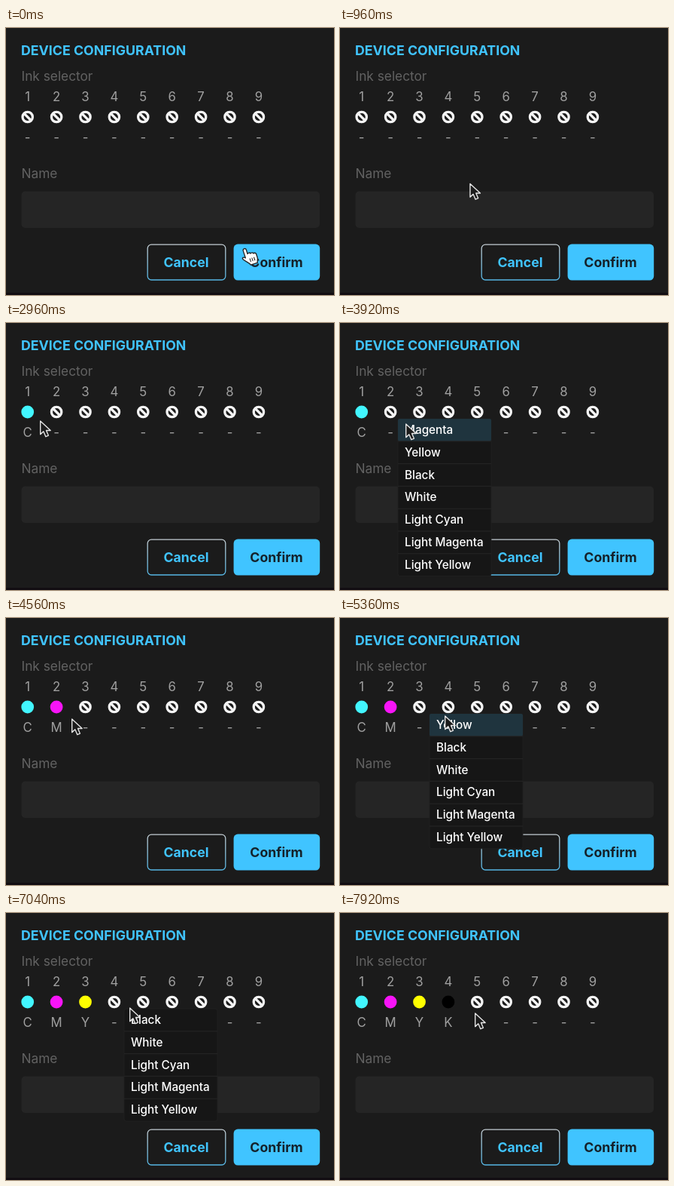
These frames come from a looping animation (436x354 px, 8 s). An HTML page:

```html
<!DOCTYPE html>
<html lang="en">
<head>
<meta charset="utf-8">
<title>Device configuration</title>
<style>
html, body { margin: 0; width: 100%; height: 100%; overflow: hidden; background: #1b1b1b; }
svg { display: block; font-family: Inter, sans-serif; font-size: 17.3px; }
.title { fill: #40c4ff; font-weight: 700; font-size: 17.75px; }
.label { fill: #626262; }
.digit, .code { fill: #a0a0a0; text-anchor: middle; font-size: 16.8px; }
.button { font-weight: 700; font-size: 17.7px; text-anchor: middle; }
.menu text { fill: #fff; font-weight: 500; font-size: 15.3px; }
</style>
</head>
<body>
<svg width="436" height="354" viewBox="0 0 436 354">
  <defs>
    <linearGradient id="edge" x2="0" y2="1">
      <stop stop-color="#c3ccd2"/><stop offset="1" stop-color="#55b5e2"/>
    </linearGradient>
    <g id="empty" fill="none" stroke="#f4f4f4">
      <circle r="6.7" stroke-width="3.3"/>
      <path d="M-5 -5L5 5" stroke-width="3.2"/>
    </g>
    <path id="plus" d="M-8 0H8M0 -8V8" stroke="#fff" stroke-width="2.8"/>
    <path id="arrow" transform="translate(.7 1) scale(.86)" d="M0 0V20.5l4.8-4.4 3.5 8 4.2-1.8-3.4-7.8h6.6z" fill="#1c1c1c" stroke="#e6e6e6" stroke-width="1.6" stroke-linejoin="round"/>
    <g id="hand" transform="rotate(-18) scale(.95)" stroke="#222" stroke-width="1.4" stroke-linejoin="round">
      <path d="M-2 2c0-3 4.5-3 4.5 0v6c1-1.5 4-1 4 .8 1-1 4-.6 4 1.2 1-.8 3.5 0 3.5 2v5c0 3-2 4-2 7h-10c-1-4-6-7-8-11-1-2.5 2-3 4-.5z" fill="#fff"/>
      <path d="M3.5 15v5M6.5 15v5M9.5 15v5" stroke-width="1.1"/>
    </g>
  </defs>
  <rect width="436" height="354" fill="#1b1b1b"/>
  <rect y="351" width="436" height="3" fill="#120d12"/>
  <text class="title" x="20" y="36">DEVICE CONFIGURATION</text>
  <text class="label" x="20.5" y="70">Ink selector</text>
  <text class="label" x="20.5" y="199">Name</text>
  <rect x="20.5" y="216.5" width="396.5" height="48.5" rx="5" fill="#252525"/>
  <rect x="188.2" y="287.2" width="103.6" height="46.8" rx="5" fill="none" stroke="url(#edge)" stroke-width="1.3"/>
  <text class="button" x="239.5" y="317" fill="#40c4ff">Cancel</text>
  <rect x="302.6" y="286.6" width="114.6" height="47.9" rx="5.5" fill="#40c4ff"/>
  <text class="button" x="359.5" y="317" fill="#14212a">Confirm</text>
  <g id="scene"></g>
</svg>
<script>
const LOOP = 8000, STEP = 80, ROW = 29.8, INK_Y = 118, MENU_Y = 127, MENU_W = 124;
const names = ['Cyan', 'Magenta', 'Yellow', 'Black', 'White', 'Light Cyan', 'Light Magenta', 'Light Yellow'];

// Each pick opens a menu beside the pointer and fills one ink slot.
const picks = [
  { open: 1920, done: 2720, x: 36, color: '#42f6ff', code: 'C' },
  { open: 3440, done: 4240, x: 77, color: '#f814f8', code: 'M' },
  { open: 5040, done: 5680, x: 119, color: '#ff0', code: 'Y' },
  { open: 6720, done: 7440, x: 157, color: '#000', code: 'K' }
];

// Pointer stops: time, x, y
const stops = [
  [0, 316.5, 293], [400, 316.5, 293], [1520, 28, 118], [2080, 28, 118], [2480, 45, 129],
  [2960, 45, 129], [3280, 69, 118], [3600, 69, 118], [3920, 87, 133], [4560, 87, 133],
  [4880, 111, 118], [5120, 111, 118], [5360, 139, 129], [5840, 139, 129], [6240, 149, 118],
  [6880, 149, 118], [7200, 179, 132], [LOOP, 179, 132]
];

const scene = document.getElementById('scene');
const inkX = i => 28.7 + 38.4 * i;
const use = (id, x, y) => `<use href="#${id}" x="${x}" y="${y}"/>`;
const place = (id, x, y) => `<g transform="translate(${x} ${y})">${use(id, 0, 0)}</g>`;

function pointer(t) {
  const i = stops.findIndex(s => s[0] > t);
  const [t0, x0, y0] = stops[i - 1], [t1, x1, y1] = stops[i];
  const p = (t - t0) / (t1 - t0), e = p * p * (3 - 2 * p);
  return [x0 + (x1 - x0) * e, y0 + (y1 - y0) * e];
}

function slot(i, t, mx, my) {
  const x = inkX(i), pick = picks[i], filled = pick && t >= pick.done;
  const hover = Math.hypot(mx - x, my - INK_Y) < 10;
  const icon = filled
    ? `<circle cx="${x}" cy="${INK_Y}" r="8.4" fill="${pick.color}"/>`
    : use(hover ? 'plus' : 'empty', x, INK_Y);
  return `<text class="digit" x="${x}" y="97">${i + 1}</text>${icon}
    <text class="code" x="${x}" y="151">${filled ? pick.code : '-'}</text>`;
}

function menu(i, mx, my) {
  const x = picks[i].x, items = names.slice(i);
  const rows = items.map((name, k) => {
    const y = MENU_Y + k * ROW;
    const over = mx >= x && mx < x + MENU_W && my >= y && my < y + ROW;
    return (over ? `<rect x="${x}" y="${y}" width="${MENU_W}" height="${ROW}" rx="2" fill="#1f343e"/>` : '') +
      (k ? `<path d="M${x} ${y}h${MENU_W}" stroke="#262626"/>` : '') +
      `<text x="${x + 9}" y="${y + 20}">${name}</text>`;
  });
  return `<g class="menu"><rect x="${x}" y="${MENU_Y}" width="${MENU_W}" height="${items.length * ROW}"
    rx="3" fill="#161616" stroke="#222" stroke-width=".8"/>${rows.join('')}</g>`;
}

function draw(now) {
  const t = Math.floor(now % LOOP / STEP) * STEP;
  const [mx, my] = pointer(t);
  const active = picks.findIndex(p => t >= p.open && t < p.done);
  let out = '';
  for (let i = 0; i < 9; i++) out += slot(i, t, mx, my);
  if (active >= 0) out += menu(active, mx, my);
  out += place(mx > 303 && my > 287 ? 'hand' : 'arrow', mx, my);
  scene.innerHTML = out;
}

let start;
function frame(now) {
  start ??= now;
  draw(now - start);
  requestAnimationFrame(frame);
}
draw(0);
requestAnimationFrame(frame);
</script>
</body>
</html>
```
